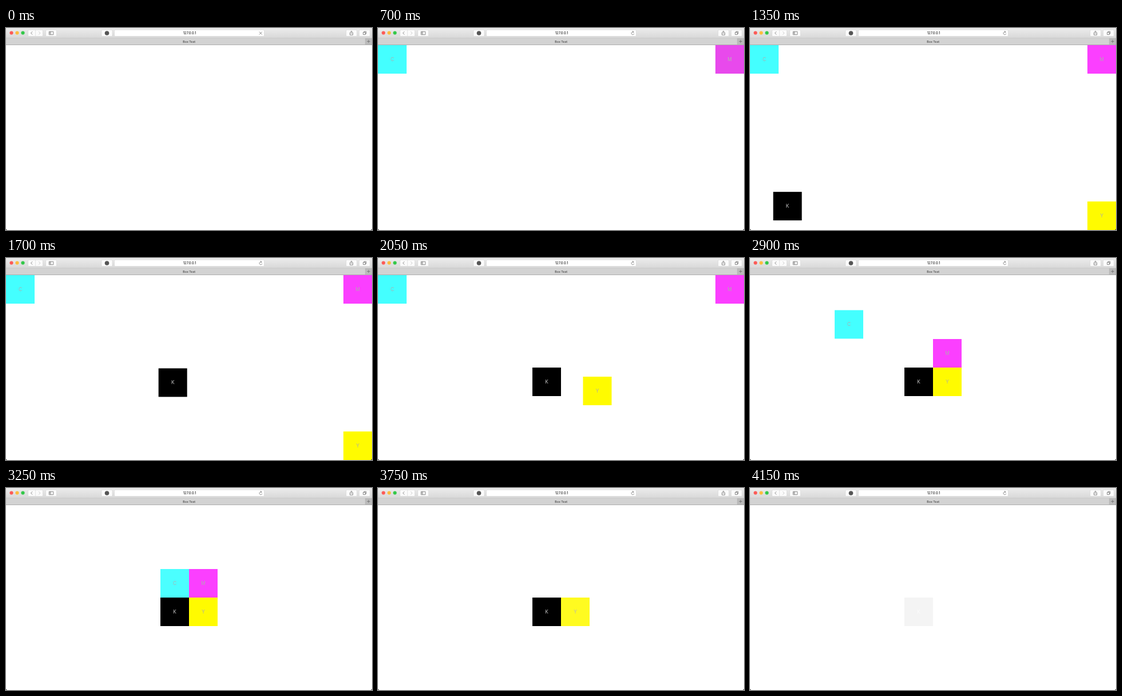
Write an HTML page that moves like this. It is 640x354 px and loops after 4250 ms.

```html
<!DOCTYPE html>
<html lang="en">
<head>
<meta charset="utf-8">
<title>Box Test</title>
<style>
  html, body { margin: 0; width: 100%; height: 100%; overflow: hidden; background: #fff; }
  svg { display: block; width: 100vw; height: 100vh; }
  text { font-family: Inter, Roboto, "Liberation Sans", sans-serif; text-anchor: middle; }
  .button { fill: #fbfbfb; stroke: #cdcdcd; stroke-width: .5; }
  .icon { fill: none; stroke: #666; stroke-width: .75; }
</style>
</head>
<body>
<svg viewBox="0 0 640 354" xmlns="http://www.w3.org/2000/svg">
  <defs>
    <linearGradient id="toolbar" x2="0" y2="1">
      <stop stop-color="#ececec"/>
      <stop offset="1" stop-color="#d8d8d8"/>
    </linearGradient>
  </defs>
  <rect width="640" height="354" fill="#fff"/>
  <g id="boxes"></g>

  <rect width="640" height="18" fill="url(#toolbar)"/>
  <rect y="18" width="640" height="12" fill="#d3d3d3"/>
  <rect x="628" y="18" width="12" height="12" fill="#bababa"/>
  <path d="M0 17.75H640M628.25 18V29" stroke="#b9b9b9" stroke-width=".5"/>
  <path d="M0 29.5H640" stroke="#adadad"/>
  <path class="icon" d="M631.3 23.5h5.4M634 20.8v5.4"/>

  <circle cx="9.5" cy="8.5" r="3.1" fill="#fc5b57"/>
  <circle cx="19.5" cy="8.5" r="3.1" fill="#fdbd3e"/>
  <circle cx="29.5" cy="8.5" r="3.1" fill="#34c84a"/>

  <g class="button">
    <rect x="38.5" y="3.3" width="26" height="11.2" rx="1.6"/>
    <path d="M51.5 3.3v11.2"/>
    <rect x="69.5" y="3.3" width="19" height="11.2" rx="1.6"/>
    <rect x="167" y="3.3" width="19" height="11.2" rx="1.6"/>
    <rect x="189.5" y="3.3" width="262" height="11.2" rx="1.6" fill="#fff"/>
    <rect x="594.7" y="3.3" width="19" height="11.2" rx="1.6"/>
    <rect x="617.5" y="3.3" width="19" height="11.2" rx="1.6"/>
  </g>
  <g class="icon">
    <path d="M46.2 6.2L43.6 8.9l2.6 2.7"/>
    <path d="M57.2 6.2l2.6 2.7-2.6 2.7" stroke="#bbb"/>
    <path d="M75.3 6.3h7.5v5.4h-7.5zM78 6.3v5.4M76 7.9h1.2M76 9.4h1.2"/>
    <path d="M602.7 8h-1.2v4.2h5V8h-1.2M604 10V5.4M602.5 6.8L604 5.3l1.5 1.5"/>
    <path d="M624.6 7.6h3.8v3.9h-3.8zM626 7.6V6.2h3.8v3.9h-1.4"/>
    <path id="stop" d="M442.8 6.6l5 5M447.8 6.6l-5 5"/>
    <path id="reload" d="M447.6 8.1a2.4 2.4 0 1 0 .2 1.7M445.2 5.2l1.7 1.4-1.7 1.4"/>
  </g>
  <circle cx="176.5" cy="9" r="3.8" fill="#555"/>
  <text x="321" y="11.2" font-size="5.8" font-weight="500" fill="#222">127.0.0.1</text>
  <text x="320.2" y="25.8" font-size="5.3" font-weight="500" fill="#444">Box Test</text>
  <path d="M0 352v2h2Q.5 353.5 0 352M640 352v2h-2q1.5-.5 2-2" fill="#222"/>
</svg>
<script>
const LOOP = 4250, STEP = 50, LAST = 4150;
const FADE = 250, MOVE = 484;

const boxes = [
  { name: 'C', rgb: [68, 255, 255], ink: '#a6b0b0', from: [0, 30],    to: [270, 142], show: 284,  move: 2746, hide: 3236 },
  { name: 'M', rgb: [251, 63, 255], ink: '#b4a4b4', from: [590, 30],  to: [320, 142], show: 535,  move: 2247, hide: 3478 },
  { name: 'Y', rgb: [255, 251, 0],  ink: '#b0b0a0', from: [590, 304], to: [320, 192], show: 786,  move: 1778, hide: 3720 },
  { name: 'K', rgb: [0, 0, 0],      ink: '#c4c4c4', from: [0, 304],   to: [270, 192], show: 1036, move: 1286, hide: 3961 }
];

const byId = id => document.getElementById(id);

function add(parent, tag, attrs) {
  const node = document.createElementNS('http://www.w3.org/2000/svg', tag);
  for (const key in attrs) node.setAttribute(key, attrs[key]);
  return parent.appendChild(node);
}

// CSS "ease": cubic-bezier(.25, .1, .25, 1)
function ease(p) {
  if (p <= 0) return 0;
  if (p >= 1) return 1;
  let low = 0, high = 1;
  for (let i = 0; i < 24; i++) {
    const s = (low + high) / 2;
    if (.75 * s * (1 - s) + s ** 3 < p) low = s; else high = s;
  }
  const s = low, r = 1 - s;
  return .3 * s * r * r + 3 * s * s * r + s ** 3;
}

const progress = (t, start, length) => ease((t - start) / length);

for (const box of boxes) {
  box.group = add(byId('boxes'), 'g', {});
  box.square = add(box.group, 'rect', { width: 50, height: 50 });
  add(box.group, 'text', { x: 25, y: 27.6, 'font-size': 8.3, fill: box.ink }).textContent = box.name;
}

function draw(t) {
  const loading = t < 250;
  byId('stop').setAttribute('visibility', loading ? 'visible' : 'hidden');
  byId('reload').setAttribute('visibility', loading ? 'hidden' : 'visible');
  for (const box of boxes) {
    const shown = progress(t, box.show, FADE);
    const hidden = progress(t, box.hide, FADE);
    const moved = progress(t, box.move, MOVE);
    const [x, y] = box.from.map((v, i) => v + (box.to[i] - v) * moved);
    box.group.setAttribute('transform', `translate(${x} ${y})`);
    box.group.setAttribute('opacity', shown * (1 - hidden));
    box.square.setAttribute('fill', `rgb(${box.rgb.map(c => Math.round(c * shown))})`);
  }
}

const start = performance.now();
function tick() {
  const t = (performance.now() - start) % LOOP;
  draw(Math.min(Math.floor(t / STEP) * STEP, LAST));
  requestAnimationFrame(tick);
}
tick();
</script>
</body>
</html>
```
